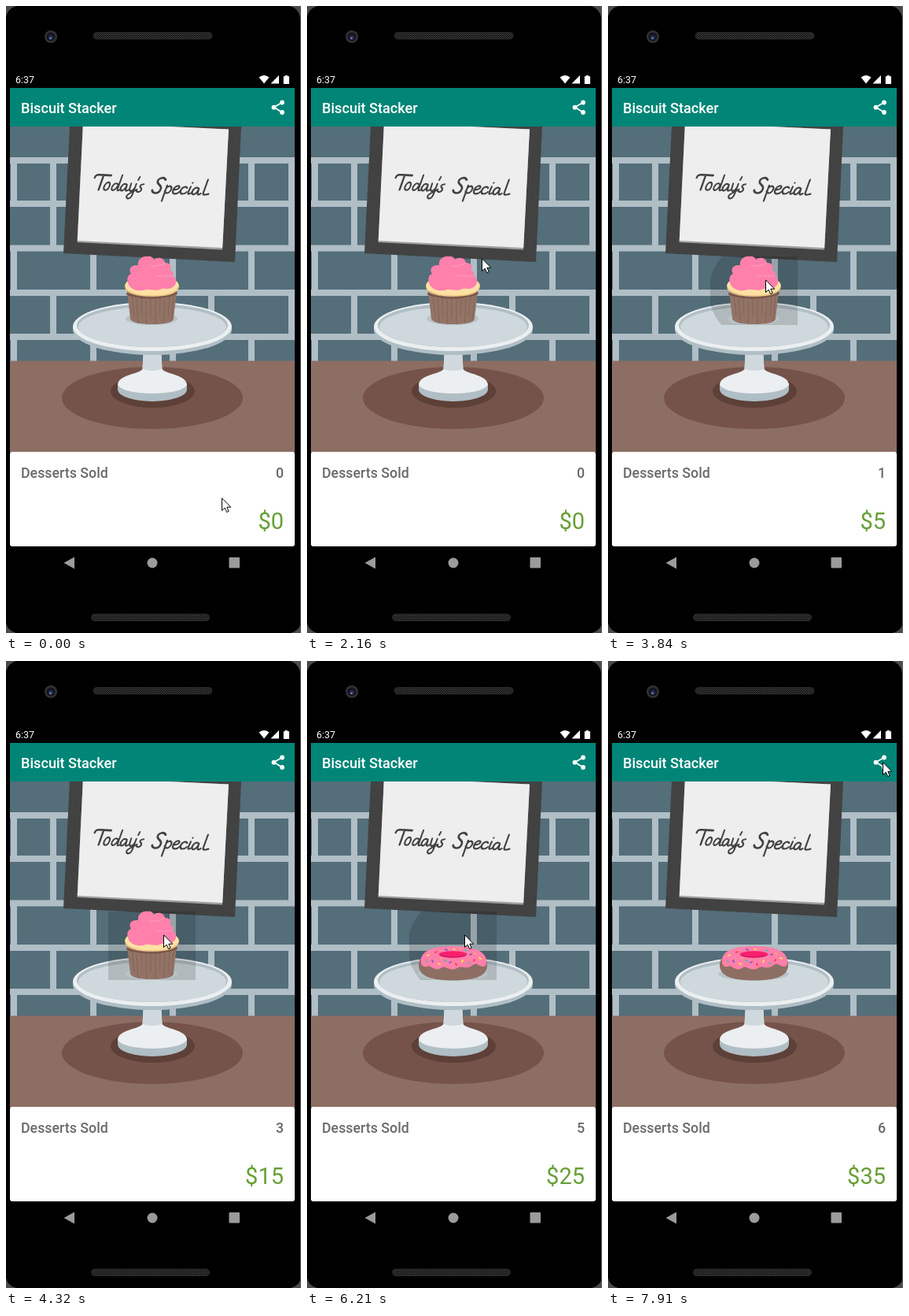
An HTML page for the animation above (8000 ms loop, 375x796 px).

```html
<!DOCTYPE html>
<html lang="en">
<head>
<meta charset="utf-8">
<title>Biscuit Stacker</title>
<style>
html, body { margin: 0; width: 100%; height: 100%; overflow: hidden; background: #000; }
svg { display: block; width: 375px; height: 796px; font-family: Roboto, sans-serif; }
.medium { font-weight: 500; }
.end { text-anchor: end; }

#cursor, #ripple, #rows, #cupcake, #donut { animation: 8s step-end infinite; }
#cursor { animation-name: move; }
#ripple { animation-name: press; transform-origin: 193px 362px; }
#rows { animation-name: count; }
#cupcake { animation-name: leave; }
#donut { animation-name: arrive; }

@keyframes move {
  0% { transform: translate(274px, 624px); }
  5.125% { transform: translate(299px, 652px); }
  7% { transform: translate(309px, 668px); }
  8.875% { transform: translate(304px, 666px); }
  10.75% { transform: translate(319px, 639px); }
  12.625% { transform: translate(326px, 680px); }
  14.125% { transform: translate(271px, 707px); }
  16% { transform: translate(136px, 721px); }
  17.625% { transform: translate(131px, 707px); }
  19.5% { transform: translate(146px, 650px); }
  21% { transform: translate(190px, 530px); }
  22.5% { transform: translate(250px, 400px); }
  24% { transform: translate(292px, 310px); }
  25.5% { transform: translate(265px, 275px); }
  27% { transform: translate(222px, 320px); }
  28.5% { transform: translate(200px, 347px); }
  86.125% { transform: translate(203px, 420px); }
  87.625% { transform: translate(206px, 482px); }
  89.5% { transform: translate(204px, 430px); }
  91% { transform: translate(244px, 270px); }
  92.5% { transform: translate(286px, 154px); }
  94.375% { transform: translate(318px, 138px); }
  95.875% { transform: translate(336px, 131px); }
  97.375% { transform: translate(346px, 127px); }
  98.875%, 100% { transform: translate(349px, 128px); }
}
@keyframes press {
  0%, 55.875%, 62.5%, 67.25%, 81%, 100% { opacity: 0; transform: scale(1); }
  33.5%, 48%, 52.5%, 59.125%, 64.25%, 77.625% { opacity: 1; transform: scale(1); }
  35%, 49.5%, 54%, 65.75%, 79.125% { opacity: 1; transform: scale(1.4); }
  36.625%, 60.625% { opacity: .12; transform: scale(1.4); }
  51% { opacity: .25; transform: scale(1.4); }
}
@keyframes count {
  0% { transform: translateY(0); }
  35% { transform: translateY(-120px); }
  49.5% { transform: translateY(-240px); }
  54% { transform: translateY(-360px); }
  60.625% { transform: translateY(-480px); }
  65.75% { transform: translateY(-600px); }
  79.125%, 100% { transform: translateY(-720px); }
}
@keyframes leave { 0% { opacity: 1; } 65.75%, 100% { opacity: 0; } }
@keyframes arrive { 0% { opacity: 0; } 65.75%, 100% { opacity: 1; } }
</style>
</head>
<body>
<svg viewBox="0 0 375 796">
  <defs>
    <pattern id="mesh" width="3" height="3" patternUnits="userSpaceOnUse">
      <rect width="3" height="3" fill="#161616"/>
      <path d="M0 0L3 3M3 0L0 3" stroke="#383838" stroke-width=".8"/>
    </pattern>
    <clipPath id="view"><rect x="5" y="153" width="362" height="414"/></clipPath>
    <clipPath id="tile"><rect x="130" y="318" width="111" height="87"/></clipPath>
    <clipPath id="card"><rect x="5" y="567" width="362" height="119"/></clipPath>
    <clipPath id="cup"><path id="cupShape" d="M154 362L158 397Q160 404 186 404Q212 404 213 397L217 362z"/></clipPath>
  </defs>

  <!-- phone body -->
  <rect width="375" height="796" fill="#000"/>
  <path d="M0 0H13Q3 3 0 13zM375 0H361Q372 3 374 15H375zM0 783Q2 793 13 796H0zM375 783Q373 793 362 796H375z" fill="#4a4a4a"/>
  <path d="M374.500 0V796" stroke="#666"/>
  <circle cx="57" cy="39" r="8" fill="#353133"/>
  <circle cx="57" cy="39" r="5.600" fill="#15151d"/>
  <circle cx="57" cy="40" r="2.800" fill="#26305a"/>
  <circle cx="56.500" cy="41" r="1.200" fill="#7488c8"/>
  <g fill="url(#mesh)" stroke="#303030" stroke-width=".8">
    <rect x="111" y="33.500" width="151" height="8.500" rx="4.200"/>
    <rect x="108.500" y="772" width="150" height="8.500" rx="4.200"/>
  </g>

  <!-- status bar -->
  <text x="12" y="98" font-size="12.400" fill="#fff">6:37</text>
  <g fill="#fff">
    <path d="M321.500 90.500Q328 85.500 334.500 90.500L328 98.500z"/>
    <path d="M347 88V98.500H336.500z"/>
    <path d="M354.800 88H357.800V89.300H360V99H352.800V89.300H354.800z"/>
  </g>

  <!-- app bar -->
  <rect x="5" y="104" width="362" height="49" fill="#008577"/>
  <text class="medium" x="19" y="136" font-size="18.100" fill="#fff">Biscuit Stacker</text>
  <path d="M351 122.500L340.500 128.500L351 135" fill="none" stroke="#fff" stroke-width="1.800"/>
  <g fill="#fff">
    <circle cx="351" cy="122.500" r="2.900"/><circle cx="340.500" cy="128.700" r="2.900"/><circle cx="351" cy="135" r="2.900"/>
  </g>

  <g clip-path="url(#view)">
    <!-- brick wall and table -->
    <rect x="5" y="153" width="362" height="298" fill="#546e7a"/>
    <g fill="none" stroke="#b0bec5" stroke-width="8">
      <path d="M5 196H367M5 251H367M5 307.500H367M5 364H367M5 420H367"/>
      <path id="odd" d="M60 251V307M160 251V307M261 251V307M363 251V307"/>
      <use href="#odd" y="-56"/>
      <use href="#odd" y="113"/>
      <path id="even" d="M10 196V251M111 196V251M212 196V251M312 196V251"/>
      <use href="#even" y="112"/>
      <use href="#even" y="224"/>
    </g>
    <rect x="5" y="450.500" width="362" height="117" fill="#8d6e63"/>

    <!-- sign -->
    <path d="M81 153H299L291 325L73 314z" fill="#424242"/>
    <path d="M98 148L283 156.500L275 309.500L90.500 300z" fill="#9e9e9e"/>
    <path d="M98 148L283 156.500L275.200 307L90.800 298z" fill="#eee"/>
    <g role="img" aria-label="Today's Special" transform="translate(112 233) rotate(3) skewX(-14)"
       fill="none" stroke="#424242" stroke-width="2.200" stroke-linecap="round" stroke-linejoin="round">
      <g transform="scale(.94 1)">
        <path d="M-4-15Q-4-19 1-19H17M7-19L6 0" stroke-width="2.600"/>
        <path d="M17-10C12-11 10 0 15 0C20 0 20-9 17-10"/>
        <path d="M30-8C25-12 22-5 23-2C25 2 29-2 30-6M32-20L31-3Q31 1 34-1"/>
        <path id="a" d="M42-8C37-12 34-5 35-2C37 2 41-2 42-7V-2Q43 1 46-2"/>
        <path d="M47-10V-4C47 1 52 0 53-4M54-10L53 4C52 11 46 10 46 6C46 3 52 1 57-3"/>
        <path d="M56-19L55-15M64-10C58-9 60-6 62-5C65-2 60 2 57-1"/>
      </g>
      <path d="M86-17C82-22 75-18 77-13C79-10 85-9 83-3C81 2 74 1 73-3" stroke-width="2.600"/>
      <path d="M90-10L89 10M90-7C94-12 98-8 96-3C94 1 90 0 89-3"/>
      <path d="M100-5C108-6 107-11 103-10C98-8 98 1 103 0Q106 0 108-3"/>
      <path d="M116-8C113-12 108-7 109-3C110 1 115 0 117-3"/>
      <path d="M120-10L119-3Q119 1 123-2M121-15h.1"/>
      <use href="#a" x="89"/>
      <path d="M139-20L138-3Q138 1 145-2"/>
    </g>

    <!-- cake stand -->
    <ellipse cx="186" cy="497.500" rx="115" ry="39.500" fill="#76534a"/>
    <ellipse cx="186.500" cy="489" rx="53.500" ry="21" fill="#5d4037"/>
    <path d="M142 480V487A44 15 0 0 0 230 487V480z" fill="#b0bec5"/>
    <path d="M175 436L173.500 461C170 467 144 468 142 480A44 12 0 0 0 230 480C228 468 202 467 198.500 461L197 436z" fill="#eceff1"/>
    <path d="M175 436L173.500 461Q186 465 198.500 461L197 436z" fill="#cfd8dc"/>
    <path d="M85 407V411A101 32 0 0 0 287 411V407z" fill="#b0bec5"/>
    <ellipse cx="186" cy="407" rx="101" ry="31" fill="#eceff1"/>
    <ellipse cx="186" cy="405.500" rx="96" ry="27.500" fill="#b0bec5"/>
    <ellipse cx="186" cy="407.500" rx="94" ry="25.500" fill="#cfd8dc"/>

    <g clip-path="url(#tile)"><circle id="ripple" cx="193" cy="362" r="65" fill="#000" fill-opacity=".14"/></g>

    <g id="cupcake">
      <ellipse cx="185" cy="397" rx="33" ry="8" fill="#b8c4c8"/>
      <use href="#cupShape" fill="#927467"/>
      <g clip-path="url(#cup)" stroke="#795548" stroke-width="1" stroke-opacity=".55">
        <path d="M160 366L163 394M166 371L168 403M172 367L173 392M178 374L178.500 404M184 368V396M190 372V404M196 367L195.500 392M202 371L200.500 402M208 366L206 394M213 368L210 400"/>
      </g>
      <path d="M153 364Q186 376 218 363L217.500 366Q186 377 153.500 367z" fill="#795548"/>
      <ellipse cx="185.500" cy="355" rx="34.500" ry="13" fill="#ffe0a3"/>
      <path d="M152 358Q156 368 186 368Q216 368 219 357" fill="none" stroke="#f5cc85" stroke-width="1.500"/>
      <path d="M156 354C152 345 156 341 159 340C155 334 159 328 168 329C167 321 174 317 180 318C185 317 187 320 188 322C192 318 201 319 202 326C210 326 211 332 208 335C213 337 214 340 212 343C218 345 217 354 213 356C208 361 201 358 198 359C190 363 182 359 178 360C170 363 160 361 156 354z" fill="#ff80ab"/>
      <path d="M190 342Q204 344 212 342M183 330Q195 331 202 326" fill="none" stroke="#ff9dbf"/>
    </g>

    <g id="donut">
      <ellipse cx="185" cy="397.500" rx="45" ry="8" fill="#b8c4c8"/>
      <path d="M142 386C142 375 150 370 186 370C222 370 229 375 229 386C229 401 211 405.500 186 405.500C160 405.500 142 401 142 386z" fill="#8d6e63"/>
      <path d="M145 383C143 368 160 362 186 362C213 362 230 369 228 384C226 391 221 387 216 385C211 383 210 389 204 389C198 390 197 387 192 389C185 394 180 390 176 389C171 387 169 393 163 391C157 389 156 386 152 388C148 389 146 387 145 383z" fill="#ff80ab"/>
      <ellipse cx="185.500" cy="372.500" rx="18" ry="4.200" fill="#f50057" fill-opacity=".75"/>
      <path d="M170 374Q185 378 201 374" fill="none" stroke="#c51162" stroke-width="1.200"/>
      <g stroke-width="1.700" stroke-linecap="round">
        <path d="M153 374l2-1M186 366h2M167 384l2 1M197 382l1-2M219 377l2 1" stroke="#ffeb3b"/>
        <path d="M159 380l1 2M176 366l2 1M207 373l2-1M181 383l2-1" stroke="#7e57c2"/>
        <path d="M163 370l2-1M189 384l1 2M212 381l1-2" stroke="#f44336"/>
        <path d="M152 381l1 1M175 380l2 1M201 367l2 1M205 384l2 0" stroke="#4db6ac"/>
        <path d="M195 365l1 0M170 378l1-1M213 371l1 1" stroke="#ffb74d"/>
      </g>
    </g>
  </g>

  <!-- score card -->
  <path d="M5 569Q5 566 8 566H364Q367 566 367 569V683Q367 686 364 686H8Q5 686 5 683z" fill="#fff"/>
  <text class="medium" x="19" y="599" font-size="17.800" fill="#6a6a6a">Desserts Sold</text>
  <g clip-path="url(#card)"><g id="rows"></g></g>

  <!-- navigation -->
  <g fill="#9b9b9b">
    <path d="M73.500 707L87 699.500V714.500z"/>
    <circle cx="186" cy="707" r="6.500"/>
    <rect x="283.500" y="700" width="13.500" height="13.500" rx="1"/>
  </g>

  <path id="cursor" d="M.5.800V16.500L4.200 13.200L6.700 18.600L9.200 17.500L6.800 12.200H11.800z" fill="#fff" stroke="#000"/>
</svg>
<script>
// One row of totals per sale; the keyframes roll the strip behind the card.
const totals = [0, 5, 10, 15, 20, 25, 35];
document.getElementById('rows').innerHTML = totals.map((sum, sold) => {
  const y = sold * 120;
  return `<text class="medium end" x="353" y="${y + 599}" font-size="17.8" fill="#6a6a6a">${sold}</text>
    <text class="end" x="353" y="${y + 664}" font-size="29" fill="#689f38">$${sum}</text>`;
}).join('');
</script>
</body>
</html>
```
